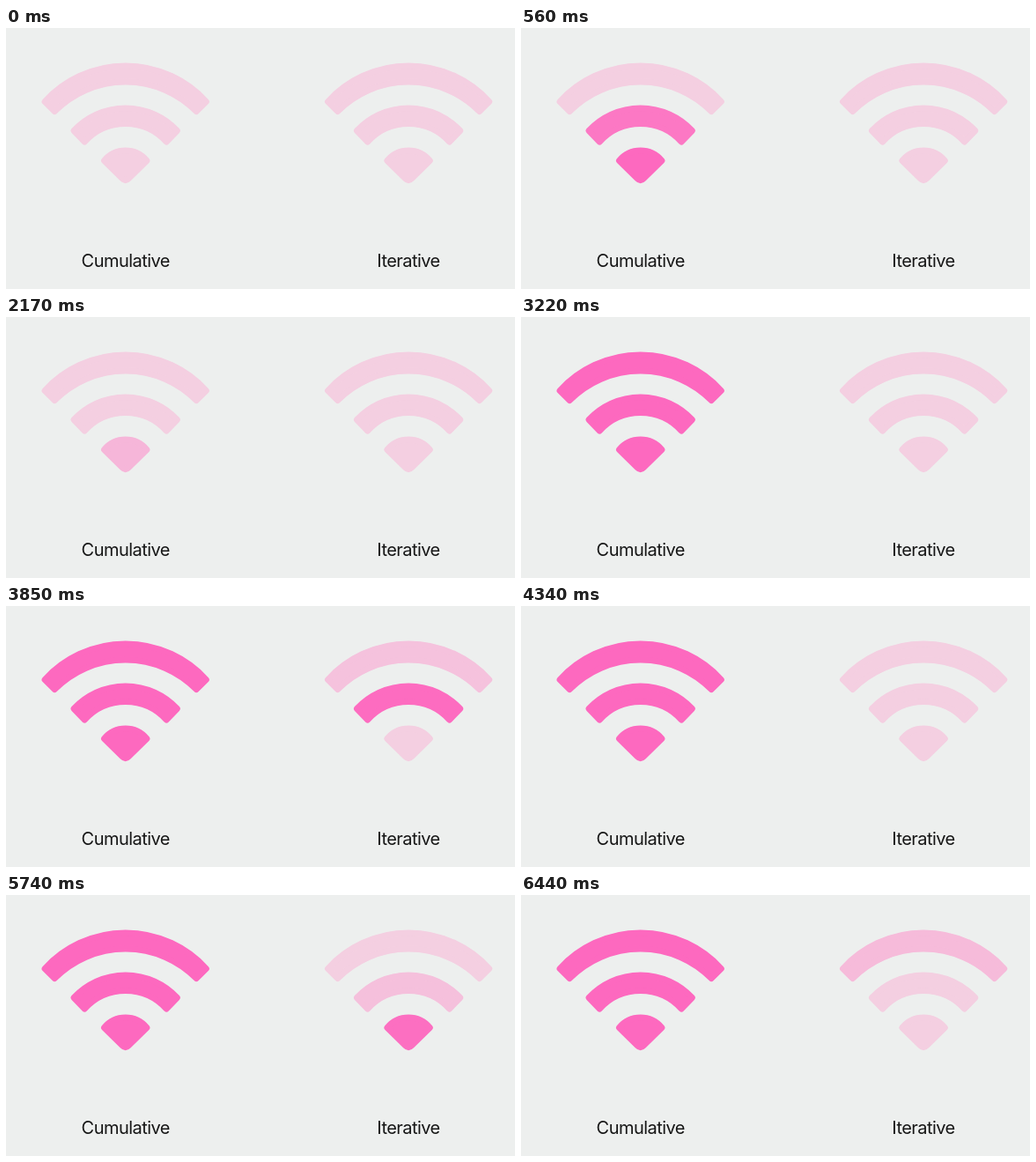
Write an HTML page that moves like this. It is 578 px wide and 296 px high and loops after 6510 ms.

```html
<!DOCTYPE html>
<html lang="en">
<head>
<meta charset="utf-8">
<title>Variable color: cumulative and iterative</title>
<style>
  html, body { margin: 0; width: 100%; height: 100%; overflow: hidden; background: #edefee; }
  svg { display: block; width: 578px; height: 296px; }
  path { stroke-width: 7; stroke-linejoin: round; }
  text {
    font: 400 20px Inter, Roboto, "Liberation Sans", sans-serif;
    letter-spacing: -0.54px;
    text-anchor: middle;
    fill: #161616;
  }
</style>
</head>
<body>
<svg id="stage" viewBox="0 0 578 296">
  <text x="135.8" y="271">Cumulative</text>
  <text x="457" y="271">Iterative</text>
</svg>
<script>
const LOOP = 6510, TICK = 70;
const DIM = [244, 207, 225], LIT = [253, 105, 191];
const STEP = 276, RAMP = 240, RISE = 80, FALL = 380, FADE = 200;
const FILL_STARTS = [0, 1030, 2030];
const PULSE_STARTS = [3188, 4268, 5348];
const HOLDS = [0, 1120, 1890, 3080];

const stage = document.getElementById('stage');
const clamp = v => Math.min(1, Math.max(0, v));
const ramp = (t, start, length = RAMP) => clamp((t - start) / length);

// Arc across a chord of the given half width and height.
function arc(half, rise, sweep) {
  const r = (half * half + rise * rise) / (2 * rise);
  return `A${r} ${r} 0 0 ${sweep} ${sweep ? half : -half} `;
}

function band(top, w1, y1, innerTop, w2, y2) {
  return `M${-w1} ${y1}${arc(w1, y1 - top, 1)}${y1}` +
    `L${w2} ${y2}${arc(w2, y2 - innerTop, 0)}${y2}Z`;
}

const SHAPES = [
  `M-24.2 150.5${arc(24.2, 11.5, 1)}150.5L3.5 170.7Q0 174.2 -3.5 170.7Z`,
  band(91, 58.6, 116.5, 108.5, 46.5, 129.1),
  band(43, 91.6, 83.5, 61, 80.5, 94.6)
];

function symbol(x) {
  return SHAPES.map(d => {
    const path = document.createElementNS('http://www.w3.org/2000/svg', 'path');
    path.setAttribute('d', d);
    path.setAttribute('transform', `translate(${x} 0)`);
    stage.append(path);
    return path;
  });
}

// Layers light up one after another and clear together; the last fill stays.
function cumulative(t, layer) {
  return Math.max(...FILL_STARTS.map((start, i) => {
    const next = FILL_STARTS[i + 1];
    const out = next === undefined ? 0 : ramp(t, next - 20, 90);
    return ramp(t, start + RISE + layer * STEP) * (1 - out);
  }));
}

// Each layer lights up alone and hands over to the next.
function iterative(t, layer) {
  return Math.max(...PULSE_STARTS.map(start => {
    const t0 = start + layer * STEP;
    return ramp(t, t0 + RISE) * (1 - ramp(t, t0 + FALL, FADE));
  }));
}

function paint(path, level) {
  const rgb = DIM.map((c, i) => Math.round(c + (LIT[i] - c) * level));
  path.style.fill = path.style.stroke = `rgb(${rgb})`;
}

const left = symbol(135.7), right = symbol(457.1);

function draw(now) {
  let t = Math.floor((now % LOOP) / TICK) * TICK;
  if (HOLDS.includes(t - TICK)) t -= TICK;
  left.forEach((path, i) => paint(path, cumulative(t, i)));
  right.forEach((path, i) => paint(path, iterative(t, i)));
}

const origin = performance.now();
function tick() {
  draw(performance.now() - origin);
  requestAnimationFrame(tick);
}
tick();
</script>
</body>
</html>
```
